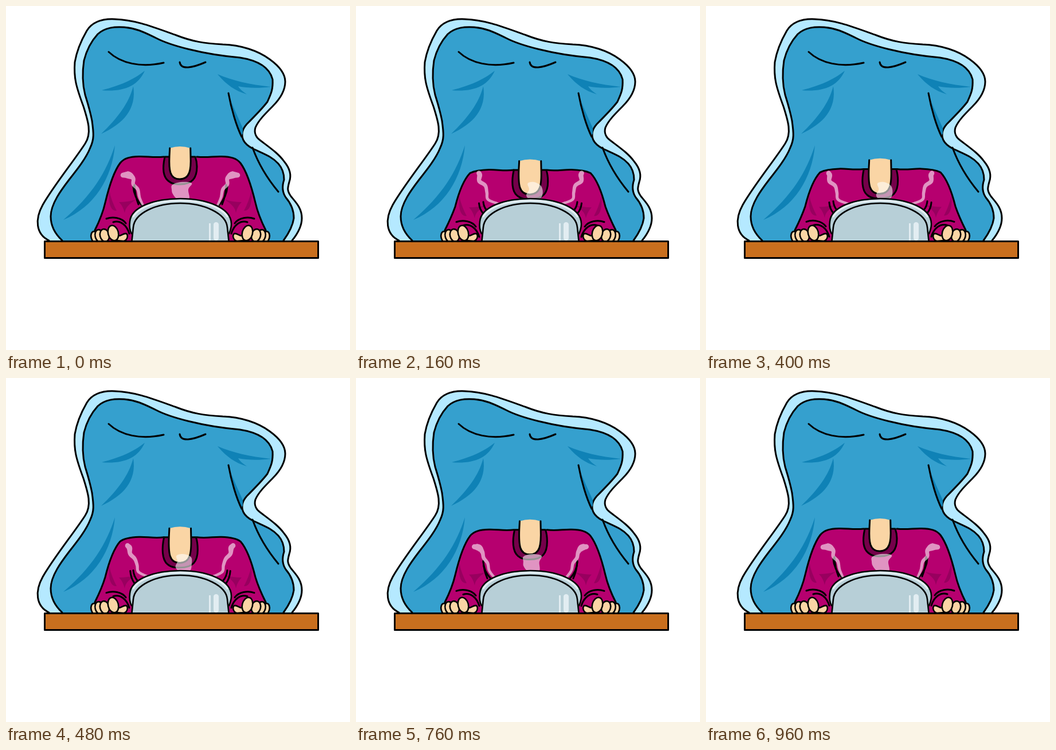
Write an HTML page with a canvas that moves like this. It is 600 px wide and 600 px high and loops after 1 s.

```html
<!DOCTYPE html>
<html lang="en">
<head>
<meta charset="utf-8">
<title>Steam inhalation</title>
<style>
html, body { margin: 0; width: 100%; height: 100%; overflow: hidden; background: #fff; }
canvas { display: block; width: 600px; height: 600px; }
</style>
</head>
<body>
<canvas id="stage" width="600" height="600"></canvas>
<script>
const ctx = document.getElementById('stage').getContext('2d');
const LOOP = 1000, STEP = 40, LOWEST = 320, RISEN = 960, DEPTH = 29.5;
const SKIN = '#fad5a5', SHIRT = '#b6006f', STEAM = 'rgba(255,255,255,.58)';

const OUTER = 'M75,409C52,398 50,372 64,347C82,315 120,268 138,240C150,222 143,200 135,175' +
  'C122,140 118,125 120,98C123,80 130,62 141,43C151,27 170,22 190,23C225,24 255,36 297,51' +
  'C325,62 345,65 378,67C410,68 440,78 460,93C478,106 487,119 487,132C487,150 475,165 465,175' +
  'C452,188 440,200 435,212C432,222 437,230 443,234C460,247 475,257 485,271C495,283 498,296 494,307' +
  'C491,318 490,322 497,332C505,342 516,352 516,370C516,385 508,398 499,409';
const INNER = 'M98,409C85,397 78,384 78,367C78,345 97,320 110,303C125,284 140,265 147,247' +
  'C154,232 153,222 150,200C146,180 142,168 138,155C133,135 133,115 136,95C141,75 150,60 160,49' +
  'C173,37 190,36 206,37C230,39 245,48 262,56C285,68 340,84 408,90C440,95 460,108 465,128' +
  'C466,148 461,155 456,167C450,175 430,196 420,206C412,215 410,225 414,234C418,242 425,246 431,249' +
  'C450,258 463,262 475,275C483,284 485,295 485,303C481,315 482,325 488,334' +
  'C495,342 502,355 502,370C500,385 492,398 484,409';
const SHADE = 'M167,147C200,138 220,130 242,113C230,140 205,150 167,147Z' +
  'M222,140C214,170 195,195 166,223C205,205 228,180 222,140Z' +
  'M190,243C175,290 150,330 100,373C155,350 185,300 190,243Z' +
  'M369,119C395,130 425,137 462,141C440,144 420,143 405,140Q408,146 420,154C400,148 385,138 369,119Z' +
  'M389,157C397,178 405,195 413,213L413,222L411,226C402,205 393,180 389,157Z';
const CREASES = 'M179,80C200,100 235,108 275,99M303,98C305,112 325,108 348,98' +
  'M388,152C393,180 402,210 411,228M430,247C440,275 455,300 475,324';
const SLEEVE = 'M180,322C183,335 187,346 193,357C183,358 178,345 180,322Z' +
  'M197,342Q212,342 226,338C215,345 208,352 207,361C205,353 202,347 197,342Z';
const CUFF = 'M175,371C186,367 202,369 209,379M187,377C200,373 211,383 215,397';
const THUMB = 'M193,409L196,401C202,401 204,396 210,397C214,401 211,409 205,410Z';
const RIM = 'M219,397C215,390 215,383 216,376C218,350 260,336 304,336C350,336 393,352 393,380C393,388 391,392 389,397Z';
const POT = 'M219,414L222,386C224,362 260,344 304,344C346,344 384,362 386,386L389,414Z';

// Steam with the head raised and lowered, as x, y pairs.
const WISP_UP = [204, 295, 214, 295, 222, 301, 222, 311, 230, 320, 233, 334, 239, 348];
const WISP_DOWN = [216, 291, 216, 294, 214, 304, 226, 311, 228, 324, 230, 337, 249, 344];
const PUFF_UP = [290, 312, 305, 307, 324, 309, 318, 320, 319, 337, 300, 337, 291, 328, 289, 320];
const PUFF_DOWN = [301, 309, 311, 307, 322, 314, 327, 326, 321, 336, 303, 336, 298, 330, 304, 320];

const mix = (a, b, k) => a + (b - a) * k;
const mixAll = (a, b, k) => a.map((v, i) => mix(v, b[i], k));

function paint(d, fill, width) {
  const p = typeof d === 'string' ? new Path2D(d) : d;
  if (fill) { ctx.fillStyle = fill; ctx.fill(p); }
  if (width) { ctx.lineWidth = width; ctx.stroke(p); }
}

function shifted(dy, draw) {
  ctx.save();
  ctx.translate(0, dy);
  draw();
  ctx.restore();
}

function mirrored(draw) {
  draw();
  ctx.save();
  ctx.translate(608, 0);
  ctx.scale(-1, 1);
  draw();
  ctx.restore();
}

// 0 = upright, 1 = bent over the pot: a quick bow, then a slow rise.
function bow(t) {
  if (t < LOWEST) return 1 - (1 - t / LOWEST) ** 2.2;
  return Math.max(0, (RISEN - t) / (RISEN - LOWEST)) ** 2.4;
}

function drawBlanket() {
  paint(OUTER, '#b5e9ff', 3);
  paint(INNER, '#35a0ce', 3);
  paint(SHADE, '#0f82b6');
  paint(CREASES, null, 3);
}

function fold(x, y, ex, ey) {
  paint(`M${x},${y}Q${x + 1},${(y + ey) / 2 + 2} ${ex},${ey}`, null, 3);
}

function drawTorso(d, k) {
  const s = 263 + d;
  const side = `M155,391C163,375 169,361 173,${343 + .3 * d}C179,${318 + .35 * d} 187,${290 + .6 * d} 199,${274 + .75 * d}` +
    `C206,${s + 2} 216,${s} 232,${s - .5}C246,${s - 1} 258,${s + 2} 275,${s}`;
  mirrored(() => {
    paint(side + `L305,${s}V409H153Z`, SHIRT);
    shifted(.4 * d, () => paint(SLEEVE, '#98005f'));
    paint(side, null, 3);
    fold(mix(224, 213, k), mix(312, 349, k), mix(231, 221, k), mix(346, 365, k));
    fold(222, mix(315, 346, k), mix(237, 226, k), mix(348, 357, k));
    shifted(.25 * d, () => paint(CUFF, null, 3));
  });

  const cx = 303.5, cw = mix(29.5, 31.5, k), low = mix(311, 341, k);
  const l = cx - cw, r = cx + cw;
  paint(`M${l + 3},${s}C${l - 1},${s + 18} ${l - 1},${low - 14} ${l + 9},${low - 6}` +
    `C${l + 16},${low} ${cx - 7},${low} ${cx},${low}C${r - 8},${low} ${r},${low - 11} ${r},${low - 31}` +
    `Q${r},${s + 8} ${r - 3},${s}Z`, '#75004a', 3);

  const nw = mix(18.5, 19.7, k), chin = mix(302, 333, k), n = 248 + .97 * d;
  const a = cx - nw, b = cx + nw;
  const neck = `M${a + .7},${n}L${a},${n + 14}C${a - 1},${chin - 17} ${a},${chin} ${cx - .5},${chin}` +
    `C${b - 1},${chin} ${b + 1},${chin - 17} ${b},${n + 14}L${b - .3},${n}`;
  paint(neck + `Q${cx},${n - 6} ${a + .7},${n}Z`, SKIN);
  paint(neck, null, 3);
}

// Bezier pieces of a smooth curve through p[i] and p[i + 1].
function spline(at, i, c) {
  const p = at(i, c), q = at(i + 1, c);
  return [p, p + (q - at(i - 1, c)) / 6, q - (at(i + 2, c) - p) / 6, q];
}

function along([a, b, c, d], u) {
  const v = 1 - u;
  return a * v ** 3 + 3 * b * v * v * u + 3 * c * v * u * u + d * u ** 3;
}

function drawSteam(k) {
  const w = mixAll(WISP_UP, WISP_DOWN, k), wisp = new Path2D();
  const at = (i, c) => w[2 * Math.max(0, Math.min(6, i)) + c];
  for (let s = 0; s <= 6; s += .05) {
    const i = Math.min(5, Math.floor(s));
    const x = along(spline(at, i, 0), s - i);
    const y = along(spline(at, i, 1), s - i) + 5 * Math.sin(Math.PI * k) * Math.sin(Math.PI * s / 6);
    const r = 4.2 - .35 * s + mix(2.4, .3, k) * Math.exp(-3 * (s - 1) ** 2);
    wisp.moveTo(x + r, y);
    wisp.arc(x, y, r, 0, 2 * Math.PI);
  }
  mirrored(() => paint(wisp, STEAM));

  const p = mixAll(PUFF_UP, PUFF_DOWN, k), puff = new Path2D();
  const ring = (i, c) => p[2 * ((i + 8) % 8) + c];
  puff.moveTo(p[0], p[1]);
  for (let i = 0; i < 8; i++) {
    const [, x1, x2, x3] = spline(ring, i, 0), [, y1, y2, y3] = spline(ring, i, 1);
    puff.bezierCurveTo(x1, y1, x2, y2, x3, y3);
  }
  paint(puff, STEAM);
}

function finger(x, y, rx, ry) {
  const p = new Path2D();
  p.ellipse(x, y, rx, ry, -.25, 0, 2 * Math.PI);
  paint(p, SKIN, 2.6);
}

function drawFront() {
  mirrored(() => {
    paint(THUMB, SKIN, 2.6);
    finger(155, 403, 6.5, 10);
    finger(163, 401, 7.5, 11);
    finger(172, 400, 8, 11);
    finger(187, 396, 9, 13.5);
  });
  paint(RIM, '#b7cfd7', 2.6);
  ctx.strokeStyle = '#e2edf1';
  paint('M222,367C234,348 268,339.5 304,339.5C340,339.5 374,349 386,367', null, 3.5);
  ctx.strokeStyle = '#000';
  paint(POT, '#b7cfd7', 2.6);
  paint('M354,379h3v30h-3ZM362,381a4.5,4 0 0 1 9,0v24a4.5,4 0 0 1 -9,0Z', '#e2edf2');
  paint('M67.5,410.5H544.5V439.5H67.5Z', '#c96f1e', 3);
}

function frame(now) {
  const t = Math.floor(now % LOOP / STEP) * STEP;
  const depth = bow(t);
  const k = depth ** .6; // folds and steam react ahead of the shoulders
  ctx.fillStyle = '#fff';
  ctx.fillRect(0, 0, 600, 600);
  ctx.strokeStyle = '#000';
  ctx.lineCap = ctx.lineJoin = 'round';
  drawBlanket();
  drawTorso(DEPTH * depth, k);
  drawSteam(k);
  drawFront();
}

const start = performance.now();
function tick() {
  frame(performance.now() - start);
  requestAnimationFrame(tick);
}
tick();
</script>
</body>
</html>
```
